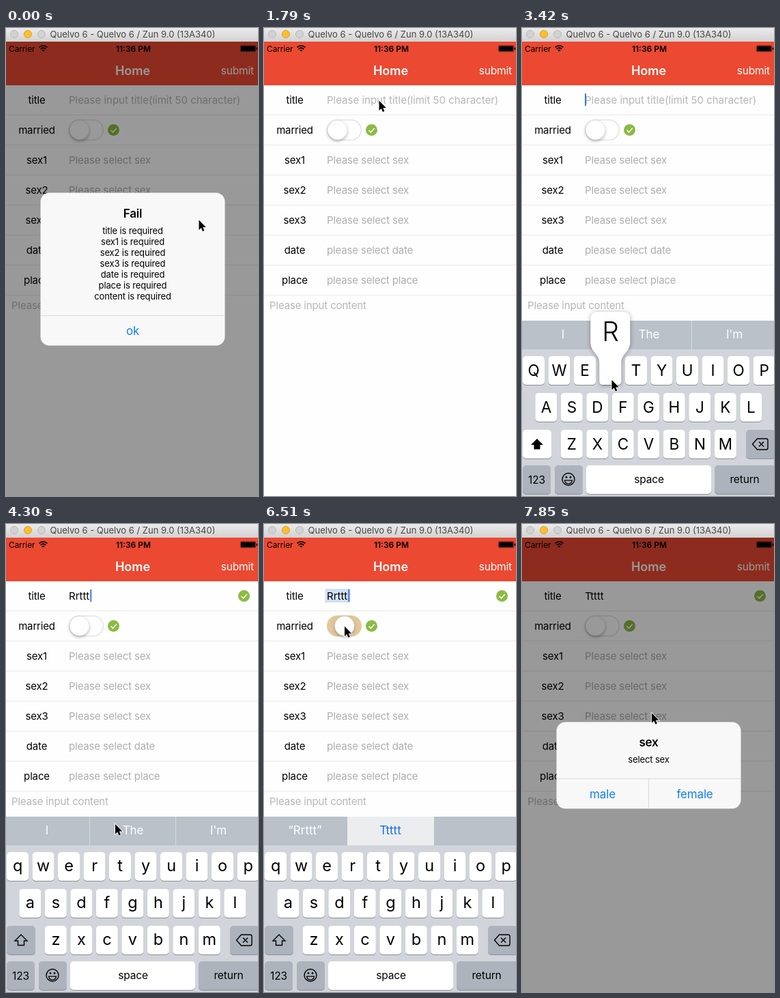
An HTML page that plays this animation: 369 by 686 pixels, repeating every 8000 ms.

```html
<!DOCTYPE html>
<html lang="en">
<head>
<meta charset="utf-8">
<title>Form demo</title>
<style>
  html, body { margin: 0; width: 100%; height: 100%; overflow: hidden; background: #fff; }
  svg { display: block; width: 369px; height: 686px; }
  text { font: 15px Inter, "Liberation Sans", sans-serif; letter-spacing: -.01em; white-space: pre; }
  .mid { text-anchor: middle; }
  .end { text-anchor: end; }
  .hint { fill: #aeaeae; }
  .pale { fill: #b6b6b6; }
  .bar, .bold, .nav, .field { letter-spacing: 0; }
  .bar { font-size: 13px; fill: #454545; }
  .status { font-size: 12px; }
  .bold { font-weight: 600; }
  .nav { font-size: 18px; font-weight: 600; fill: #fff; }
  .submit { font-size: 15.5px; fill: #fff; }
  .head { font-size: 17px; font-weight: 600; }
  .msg { font-size: 13px; }
  .btn { font-size: 17px; fill: #157efb; }
  .guess { font-size: 17px; fill: #fff; }
  .pick { fill: #1a6fe0; }
  .key { font-size: 22.5px; }
  .low { font-size: 23.5px; }
  .fn { font-size: 15.5px; }
  .big { font-size: 39px; font-weight: 300; }
  .line { stroke: #e9e9e9; }
  .cut { stroke: #d9d9dc; }
  #knob { filter: drop-shadow(0 2px 2px rgba(0, 0, 0, .28)); }
  #popup { filter: drop-shadow(0 1px 3px rgba(0, 0, 0, .35)); }
</style>
</head>
<body>
<svg id="stage" viewBox="0 0 369 686"></svg>
<script>
const LOOP = 8000, COUNT = 54, STEP = LOOP / COUNT;

const text = (x, y, str, cls = "") => `<text x="${x}" y="${y}" class="${cls}">${str}</text>`;
const mid = (x, y, str, cls = "") => text(x, y, str, "mid " + cls);
const rect = (x, y, w, h, fill, more = "") =>
  `<rect x="${x}" y="${y}" width="${w}" height="${h}" fill="${fill}" ${more}/>`;
const line = (x1, y1, x2, y2, cls) => `<path d="M${x1} ${y1}L${x2} ${y2}" class="${cls}"/>`;
const group = (id, body) => `<g id="${id}">${body}</g>`;
const circle = (x, y, r, more = "") => `<circle cx="${x}" cy="${y}" r="${r}" ${more}/>`;

const tick = (x, y) => circle(x, y, 8.5, 'fill="#8bbb42"') +
  `<path d="M${x - 4} ${y + .3}l3 3 5.2-5.8" fill="none" stroke="#fff" stroke-width="1.5"/>`;

function windowBar() {
  const dots = ["#d2d2d2", "#fdbd2f", "#d2d2d2"].map((c, i) =>
    circle(12 + 20 * i, 9, 5.5, `fill="${c}" stroke="${i === 1 ? "#dfa023" : "#b9b9b9"}"`)).join("");
  return rect(0, 0, 369, 20, "url(#chrome)") + dots +
    mid(185.5, 14, "Quelvo 6 - Quelvo 6 / Zun 9.0 (13A340)", "bar");
}

function statusBar() {
  return text(4, 34.5, "Carrier", "status") +
    `<g fill="none" stroke="#000" stroke-width="1.7">
       <path d="M48.5 28.4q6-5.2 12 0M50.6 30.8q3.9-3.4 7.8 0"/></g>
     <path d="M52.3 32.4q2.2-1.8 4.4 0l-2.2 2.4z"/>` +
    mid(186.5, 34.5, "11:36 PM", "status bold") +
    rect(343.25, 25.75, 22.5, 9, "none", 'rx="2" stroke="#000" stroke-width=".5"') +
    rect(344, 26.5, 21, 7.5, "#000", 'rx="1"') + rect(366.8, 28.5, 1.3, 3.5, "#000", 'rx=".6"');
}

function form() {
  const rows = [["title", "Please input title(limit 50 character)"], ["married", ""],
    ["sex1", "Please select sex"], ["sex2", "Please select sex"], ["sex3", "Please select sex"],
    ["date", "please select date"], ["place", "please select place"]];
  return rows.map(([label, hint], i) => {
    const y = 84 + 44 * i;
    return mid(45, y + 27, label) +
      `<text x="92" y="${y + 27}" ${i ? 'class="hint"' : 'id="hint" class="pale field"'}>${hint}</text>` +
      line(0, y + 43.5, 369, y + 43.5, "line");
  }).join("") +
    text(8, 411.5, "Please input content", "pale") +
    rect(89.5, 95, 37, 20, "#cfe0f2", 'id="mark"') +
    '<text id="typed" class="field" x="92" y="111"></text>' +
    rect(92, 96, 2, 18, "#3c78dc", 'id="caret"') +
    group("valid", tick(348.5, 105.5)) + tick(157.5, 149.5) +
    rect(92.75, 134.75, 49.5, 29.5, "#fff", 'rx="14.75" stroke="#e3e3e3" stroke-width="1.5" id="track"') +
    circle(107.5, 149.5, 14.3, 'fill="#fff" stroke="#dcdcdc" stroke-width=".5" id="knob"');
}

const ROWS = [["QWERTYUIOP", 17, 481], ["ASDFGHJKL", 35.3, 535], ["ZXCVBNM", 72.8, 589]];
const PITCH = 37.5;
const cap = (x, y, w, fill = "#fff") =>
  rect(x, y + 1, w, 42, "#8a8d92", 'rx="5"') + rect(x, y, w, 42, fill, 'rx="5"');
const eachKey = fn => ROWS.map(([keys, x, y]) =>
  [...keys].map((k, i) => fn(k, x + PITCH * i, y)).join("")).join("");

function keyboard() {
  const gray = "#adb3bd", arrow = "M22 602L31 611H26.500V617.500H17.500V611H13Z";
  return rect(0, 429, 369, 258, "#d1d5db") + rect(0, 429, 369, 42, "#bac1c9") +
    group("guessA", line(122.5, 429, 122.5, 471, "cut") + line(248.5, 429, 248.5, 471, "cut") +
      mid(60, 454.5, "I", "guess") + mid(186, 454.5, "The", "guess") + mid(311, 454.5, "I'm", "guess")) +
    group("guessB", rect(122, 429, 127, 42, "#ebedef") +
      mid(60, 454.5, "“Rrttt”", "guess field") + mid(185, 454.5, "Ttttt", "guess pick field")) +
    eachKey((k, x, y) => cap(x - 16, y, 32)) +
    cap(328, 589, 43, gray) + cap(1, 641, 41, gray) + cap(48, 641, 41, gray) +
    cap(94, 641, 183) + cap(282, 641, 89, gray) +
    group("upper", eachKey((k, x, y) => mid(x, y + 29, k, "key")) +
      cap(1, 589, 42) + `<path d="${arrow}"/>`) +
    group("lower", eachKey((k, x, y) => mid(x, y + 28, k.toLowerCase(), "key low")) +
      cap(1, 589, 42, gray) + `<path d="${arrow}" fill="none" stroke="#000" stroke-width="1.4"/>`) +
    `<g fill="none" stroke="#000" stroke-width="1.4">
       <path d="M337.500 610l7-8h13q2.500 0 2.500 2.500v11q0 2.500-2.500 2.500h-13zM347 606.500l7 7m0-7l-7 7"/>
       <circle cx="68" cy="661.500" r="9"/>
       <path d="M62.500 663.200h11q-.8 5-5.500 5t-5.500-5z" stroke-width="1.200"/></g>` +
    circle(65, 658.5, 1.4) + circle(71, 658.5, 1.4) +
    mid(21.5, 667.5, "123", "fn") + mid(186, 667, "space", "fn") + mid(326, 667, "return", "fn") +
    group("popup", `<path fill="#fff" d="M-16 518V491C-16 477-29 476-29 460V426q0-10 10-10H19q10 0 10 10V460
      C29 476 16 477 16 491V518q0 5-5 5H-11q-5 0-5-5z"/><text id="letter" y="458.500" class="mid big"></text>`);
}

// Alerts are drawn around their own centre.
function alertBox(id, h, title, lines, buttons) {
  const top = -h / 2, cut = -top - 44;
  return group(id, rect(-135, top, 270, h, "#f8f8f8", 'rx="13"') +
    mid(0, top + 36, title, "head") +
    lines.map((s, i) => mid(0, top + 60 + 16 * i, s, "msg")).join("") +
    line(-135, cut, 135, cut, "cut") +
    (buttons.length > 1 ? line(0, cut, 0, -top, "cut") : "") +
    buttons.map((b, i) => mid((i + .5) * 270 / buttons.length - 135, cut + 28.5, b, "btn")).join(""));
}

const needed = ["title", "sex1", "sex2", "sex3", "date", "place", "content"];
document.getElementById("stage").innerHTML =
  `<defs><linearGradient id="chrome" x2="0" y2="1">
     <stop stop-color="#ebebeb"/><stop offset="1" stop-color="#d2d2d2"/></linearGradient></defs>` +
  rect(0, 0, 369, 686, "#fefefe") + rect(0, 20, 369, 64, "#eb4932") +
  mid(185.5, 69, "Home", "nav") + text(363, 68, "submit", "end submit") +
  form() + group("keyboard", keyboard()) +
  rect(0, 20, 369, 666, "#000", 'id="dim"') +
  alertBox("fail", 224, "Fail", needed.map(s => s + " is required"), ["ok"]) +
  alertBox("sex", 127, "sex", ["select sex"], ["male", "female"]) +
  statusBar() + windowBar() +
  `<path id="pointer" d="M0 0V14.500L3.300 11.600 5.400 16.500 7.900 15.400 5.800 10.600H10.300Z"
     stroke="#fff" paint-order="stroke" stroke-width="1.600"/>`;

const el = Object.fromEntries([...document.querySelectorAll("[id]")].map(e => [e.id, e]));
const set = (id, attrs) => { for (const k in attrs) el[id].setAttribute(k, attrs[k]); };
const show = (id, on) => set(id, { visibility: on ? "visible" : "hidden" });

// Linear interpolation through [step, value] pairs.
function at(points, n) {
  const i = points.findIndex(p => p[0] >= n);
  if (i < 0) return points[points.length - 1][1];
  if (i === 0) return points[0][1];
  const [a, u] = points[i - 1], [b, v] = points[i];
  return u + (v - u) * (n - a) / (b - a);
}

const path = [[0, 282.5, 281.5], [1, 279, 292], [5, 190, 440], [8, 190, 440], [12, 168.5, 106.5],
  [14, 168.5, 106.5], [16, 167, 140], [21, 131.5, 516], [25, 131.5, 516], [26, 165, 511], [28, 166, 508],
  [29, 160, 440], [33, 139, 215], [34, 138, 199], [35, 138, 199], [37, 118, 150], [45, 118, 150],
  [46, 135.5, 191.5], [50, 135.5, 191.5], [51, 140, 200], [53, 190, 277]];
const pathX = path.map(([n, x]) => [n, x]), pathY = path.map(([n, , y]) => [n, y]);

const slide = [[14, 258], [15, 130], [16, 0], [47, 0], [48, 20], [49, 160], [50, 258]];
const dim = [[6, .4], [7, .26], [8, .08], [9, 0], [48, 0], [49, .1], [50, .3], [51, .4]];
const failFade = [[6, 1], [7, .6], [8, .2], [9, 0]];
const sexFade = [[48, 0], [49, .25], [50, .77], [51, 1]];
const sexScale = [[49, 1.14], [50, 1.05], [51, 1]];
const sexY = [[50, 224.4], [51, 245], [52, 325], [53, 353.75]];
const toggle = [[38, 0], [39, .5], [40, 1], [43, 1], [44, .52], [45, 0]];

function typedAt(n) {
  if (n >= 48) return "Ttttt";
  return "Rrttt".slice(0, Math.max(0, n - 23));
}

function draw(n) {
  const typed = typedAt(n), on = at(toggle, n), down = at(slide, n);
  set("pointer", { transform: `translate(${at(pathX, n)} ${at(pathY, n)})` });

  el.typed.textContent = typed;
  show("hint", !typed);
  show("valid", typed);
  show("mark", n >= 30 && n < 48);
  const busy = n > 22 && n < 31;
  show("caret", n >= 14 && n < 52 && (busy || n % 7 < 4));
  set("caret", { x: typed ? Math.min(124, 93 + el.typed.getComputedTextLength()) : 92 });

  const tint = on === 1 ? "#deb887" : "#e2c79d";
  set("knob", { cx: 107.5 + 20 * on });
  set("track", { fill: on ? tint : "#fff", stroke: on ? tint : "#e3e3e3" });

  show("keyboard", down < 258);
  set("keyboard", { transform: `translate(0 ${down})` });
  el.upper.style.display = n < 24 ? "" : "none";
  el.lower.style.display = n < 24 ? "none" : "";
  el.guessA.style.display = n < 30 ? "" : "none";
  el.guessB.style.display = n < 30 ? "none" : "";
  const pressed = { 23: "R", 25: "r", 27: "t", 28: "t" }[n];
  el.popup.style.display = pressed ? "" : "none";
  el.letter.textContent = pressed || "";
  set("popup", { transform: `translate(${pressed === "t" ? 167 : 129.3} 0)` });

  set("dim", { opacity: at(dim, n) });
  set("fail", { opacity: at(failFade, n), transform: "translate(185.5 353.5)" });
  set("sex", { opacity: at(sexFade, n),
    transform: `translate(185.5 ${at(sexY, n)}) scale(${at(sexScale, n)})` });
}

function frame() {
  const t = performance.now() % LOOP;
  draw(Math.min(COUNT - 1, Math.floor((t + 10) / STEP)));
  requestAnimationFrame(frame);
}
frame();
</script>
</body>
</html>
```
